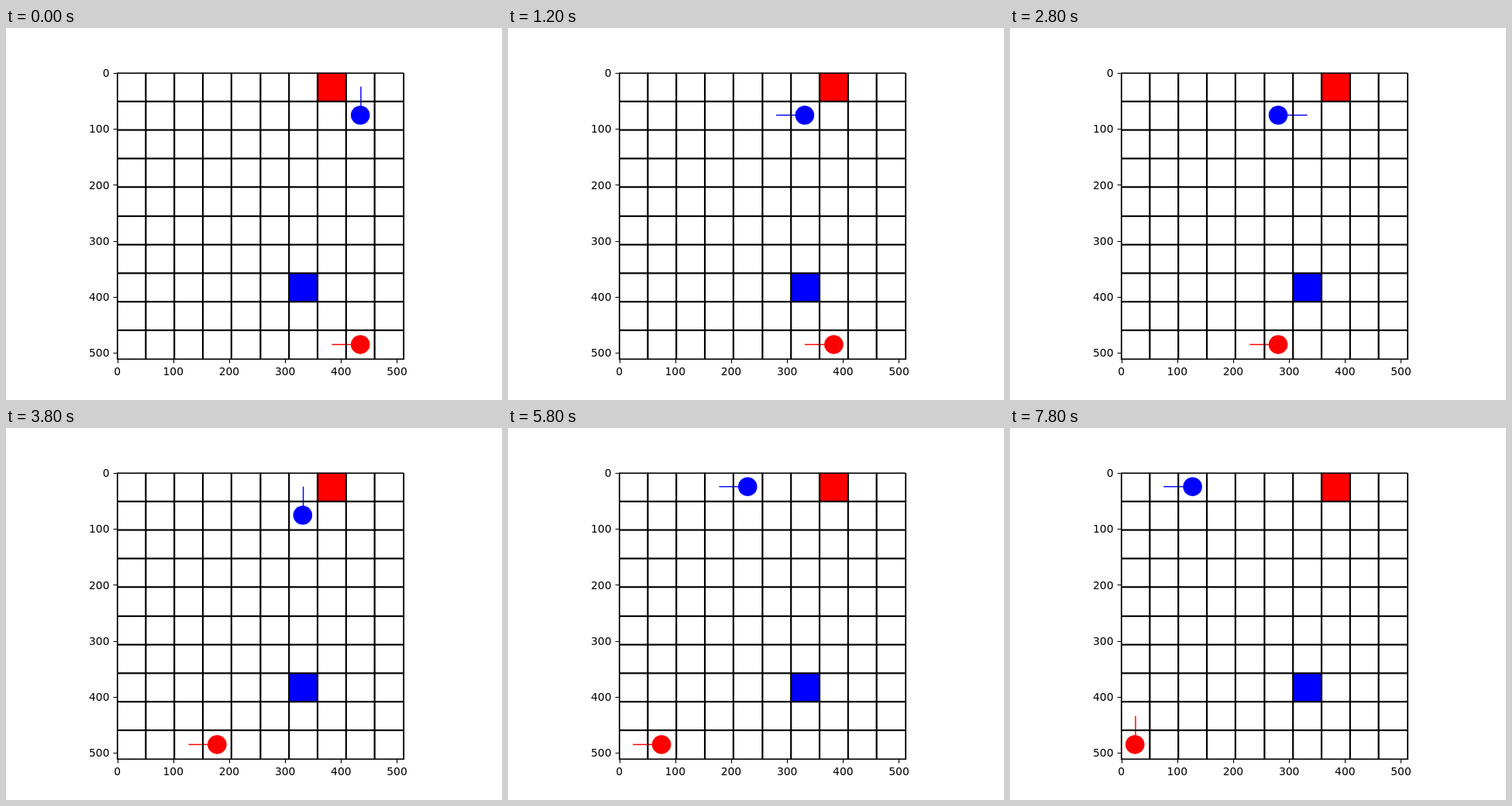
An HTML page for the animation above (8 s loop, 640 by 480 pixels).

```html
<!DOCTYPE html>
<html lang="en">
<head>
<meta charset="utf-8">
<title>Grid walkers</title>
<style>
  html, body { margin: 0; width: 100%; height: 100%; overflow: hidden; background: #fff; }
  svg { display: block; width: 640px; height: 480px; }
  text { font: 13.89px "DejaVu Sans", sans-serif; }
</style>
</head>
<body>
<svg id="stage" viewBox="0 0 640 480">
  <clipPath id="board"><rect width="512" height="512"/></clipPath>
  <g transform="translate(143.2 57.6) scale(.721875)">
    <g clip-path="url(#board)">
      <g id="agents"></g>
      <g id="grid"></g>
    </g>
  </g>
  <g id="axes"></g>
</svg>
<script>
const LOOP = 8000, CELL = 51.2, SCALE = 0.721875;
const DIRS = { L: [-1, 0], R: [1, 0], U: [0, -1], D: [0, 1] };

// Each step is a time and an action: F moves ahead, a letter turns.
const walkers = [
  { color: '#f00', goal: [7, 0], start: [8, 9, 'L'],
    steps: '600F 1400F 2200F 3000F 3800F 4600F 5400F 6200F 7800U' },
  { color: '#00f', goal: [6, 7], start: [8, 1, 'U'],
    steps: '200L 400F 1200F 2000F 2800R 3000F 3800U 4000F 4800L 5000F 5800F 6600F 7400F' }
];

const byId = id => document.getElementById(id);

function set(el, attrs) {
  for (const k in attrs) el.setAttribute(k, attrs[k]);
  return el;
}

function add(parent, tag, attrs) {
  const el = document.createElementNS('http://www.w3.org/2000/svg', tag);
  return parent.appendChild(set(el, attrs));
}

const edge = n => Math.floor(n * CELL);
const mid = n => Math.floor((n + 0.5) * CELL);

function buildGrid() {
  for (let i = 0; i <= 10; i++) {
    const p = edge(i) - 1;
    add(byId('grid'), 'rect', { x: p, y: 0, width: 3, height: 512 });
    add(byId('grid'), 'rect', { x: 0, y: p, width: 512, height: 3 });
  }
}

function buildAxes() {
  const axes = byId('axes');
  const stroke = { fill: 'none', stroke: '#000', 'stroke-width': 1.11 };
  const snap = v => Math.floor(v + 0.5) + 0.5;
  add(axes, 'rect', { x: 143.5, y: 58.5, width: 370, height: 369, ...stroke });
  for (let v = 0; v <= 500; v += 100) {
    const x = 143.2 + (v + 0.5) * SCALE;
    const y = 57.6 + (v + 0.5) * SCALE;
    add(axes, 'path', { d: `M${snap(x)} 427.5v5M143.5 ${snap(y)}h-5`, ...stroke });
    add(axes, 'text', { x, y: 448, 'text-anchor': 'middle' }).textContent = v;
    add(axes, 'text', { x: 133.5, y: Math.round(y + 5.2), 'text-anchor': 'end' }).textContent = v;
  }
}

function buildWalker(w) {
  const layer = byId('agents'), fill = w.color;
  const [gx, gy] = w.goal;
  add(layer, 'rect', { x: edge(gx), y: edge(gy), width: 51, height: 51, fill });
  w.dot = add(layer, 'circle', { r: 17, fill });
  w.ray = add(layer, 'rect', { fill });
  w.steps = w.steps.split(' ').map(s => [parseInt(s, 10), s.slice(-1)]);
}

function pose(w, t) {
  let [x, y, dir] = w.start;
  for (const [at, act] of w.steps) {
    if (at > t) break;
    if (act === 'F') {
      x += DIRS[dir][0];
      y += DIRS[dir][1];
    } else {
      dir = act;
    }
  }
  return [x, y, dir];
}

function drawWalker(w, t) {
  const [x, y, dir] = pose(w, t);
  const [dx, dy] = DIRS[dir];
  const cx = mid(x), cy = mid(y), ex = mid(x + dx), ey = mid(y + dy);
  set(w.dot, { cx, cy });
  set(w.ray, {
    x: Math.min(cx, ex),
    y: Math.min(cy, ey) - (dx ? 1 : 0),
    width: dx ? Math.abs(ex - cx) + 1 : 2,
    height: dy ? Math.abs(ey - cy) + 1 : 2
  });
}

function render(t) {
  walkers.forEach(w => drawWalker(w, t));
}

buildGrid();
buildAxes();
walkers.forEach(buildWalker);
render(0);

const began = performance.now();
function tick() {
  render((performance.now() - began) % LOOP);
  requestAnimationFrame(tick);
}
requestAnimationFrame(tick);
</script>
</body>
</html>
```
